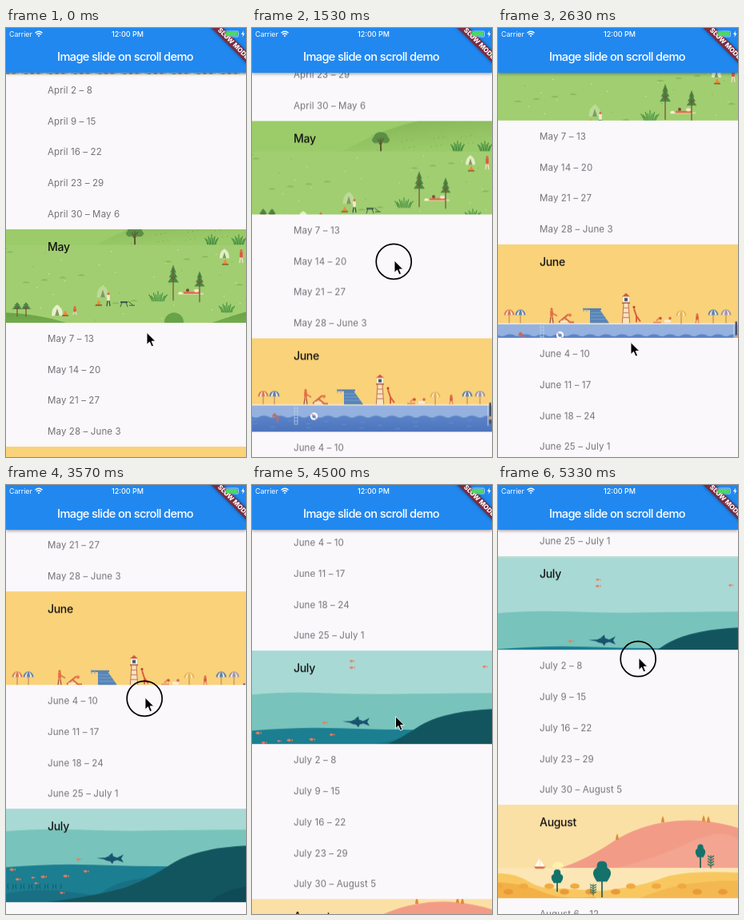
Write an HTML page that moves like this. It is 300 px wide and 537 px high and loops after 5.36 s.

```html
<!DOCTYPE html>
<html lang="en">
<head>
<meta charset="utf-8">
<title>Image slide on scroll demo</title>
<style>
html, body { margin: 0; width: 100%; height: 100%; overflow: hidden; }
body { position: relative; background: #faf8fb; font-family: Inter, Roboto, sans-serif; }
#stage { position: absolute; left: 0; top: 0; width: 300px; height: 537px; overflow: hidden; }
#list { position: absolute; left: 0; top: 0; width: 300px; will-change: transform; }
.row { position: absolute; left: 52px; margin-top: .8px; height: 38.8px; line-height: 38.8px; font-size: 11.5px; letter-spacing: .12px; color: #747276; white-space: nowrap; }
.banner { position: absolute; left: 0; width: 300px; height: 117px; overflow: hidden; }
.banner svg { position: absolute; left: 0; top: 0; }
.banner b { position: absolute; left: 52px; top: 11px; line-height: 21px; font-size: 14px; font-weight: 500; letter-spacing: -.3px; color: #111; }
#bar { position: absolute; left: 0; top: 0; width: 300px; height: 55.5px; background: #2188f0; box-shadow: 0 1px 4px rgba(0,0,0,.45); }
#bar h1 { position: absolute; left: 0; top: 26px; width: 298px; margin: 0; text-align: center; font-size: 14.6px; line-height: 21px; font-weight: 500; letter-spacing: -.62px; color: #fff; white-space: nowrap; }
#ribbon { position: absolute; left: 244px; top: 15px; width: 80px; height: 9.6px; background: #7b2c40; color: #fff; font-size: 8.2px; line-height: 9.6px; font-weight: 800; text-align: center; white-space: nowrap; transform: rotate(45deg); box-shadow: 0 0 4px rgba(0,0,0,.5); }
.status { position: absolute; top: 2px; line-height: 11px; font-size: 9px; color: #fff; white-space: nowrap; }
#icons, #pointer { position: absolute; left: 0; top: 0; overflow: visible; }
</style>
</head>
<body>
<div id="stage">
  <div id="list"></div>
  <div id="bar"><h1>Image slide on scroll demo</h1></div>
  <div id="ribbon">SLOW MODE</div>
  <span class="status" style="left:4px;font-size:8.8px">Carrier</span>
  <span class="status" style="left:102px;width:100px;text-align:center;font-weight:500">12:00 PM</span>
  <svg id="icons" width="300" height="20" fill="none" stroke="#fff">
    <path d="M36.5 6.2Q41 2.2 45.5 6.2M38.2 8.2Q41 5.8 43.8 8.2" stroke-width="1.4"/>
    <circle cx="41" cy="10" r="1" fill="#fff" stroke="none"/>
    <rect x="273.5" y="4" width="17" height="7" rx="1.5" stroke-width=".6"/>
    <rect x="274.5" y="5" width="15" height="5" rx="1" fill="#4cd964" stroke="none"/>
    <path d="M297 3.5L294 8H296L295.5 11.5L298.5 6.8H296.5Z" fill="#fff" stroke="none"/>
  </svg>
  <svg id="pointer" width="1" height="1">
    <circle id="ring" cx="-.8" cy="1.5" r="22" fill="none" stroke="#000" stroke-width="1.7"/>
    <path d="M0 .3V15.3L3.5 12L6 17.8L8.5 16.7L6.1 11.1H10.8Z" fill="#000" stroke="#fff" stroke-width=".9"/>
  </svg>
</div>
<script>
const LOOP = 5360, STEP = 100 / 3, ROW = 38.8, BANNER = 117, BAR = 55, SLIDE = 0.136;

// Shape helpers
const path = (d, fill) => `<path d="${d}" fill="${fill}"/>`;
const line = (d, color, w = 1) => `<path d="${d}" fill="none" stroke="${color}" stroke-width="${w}"/>`;
const rect = (x, y, w, h, fill) => `<rect x="${x}" y="${y}" width="${w}" height="${h}" fill="${fill}"/>`;
const oval = (x, y, rx, ry, fill) => `<ellipse cx="${x}" cy="${y}" rx="${rx}" ry="${ry}" fill="${fill}"/>`;
const many = (n, f) => Array.from({ length: n }, (_, i) => f(i)).join('');
const fade = (id, from, to, x = 0) => `<linearGradient id="${id}" x1="0" y1="0" x2="${x}" y2="1">` +
  `<stop stop-color="${from}"/><stop offset="1" stop-color="${to}"/></linearGradient>`;

const grass = (x, y, w, h) => many(9, i => {
  const k = (i - 4) / 4, tip = h * (1 - .35 * Math.abs(k)) * (i % 2 ? .75 : 1);
  return line(`M${x + k * w * .3} ${y}Q${x + k * w * .35} ${y - tip * .6} ${x + k * w / 2} ${y - tip}`, '#3f8b3c', 1.1);
});
const pine = (x, top, base, w) => {
  const tier = (base - top) * .17;
  return [0, 1, 2].map(i => path(`M${x} ${top + i * tier * .8}l${w * (.26 + i * .12)} ${tier * 1.3}h${-w * (.52 + i * .24)}z`, '#4b8843')).join('') +
    line(`M${x} ${top + 5}V${base}M${x - 3} ${top + tier * 2}l3 3l3 -4`, '#765a38', 1.3);
};
const tent = (x, y, r, fill) => path(`M${x - r} ${y}Q${x - r} ${y - r * 1.5} ${x} ${y - r * 2}Q${x + r} ${y - r * 1.5} ${x + r} ${y}z`, fill) +
  path(`M${x} ${y - r * 1.3}l${r * .4} ${r * 1.3}h${-r * .8}z`, '#7d9b62');
const person = (x, y, h, top, legs) => oval(x, y - h + 1.5, 1.5, 1.6, '#d9684a') +
  rect(x - 1.8, y - h + 3, 3.6, h * .42, top) +
  line(`M${x - 1} ${y - h * .4}L${x - 2} ${y}M${x + 1} ${y - h * .4}L${x + 2} ${y}`, legs, 1.3);
const fire = (x, y) => path(`M${x - 3} ${y}l3 -6l3 6z`, '#f08a32') + rect(x - 4, y, 8, 1.5, '#8b5634');
const umbrella = (x, y, color) => line(`M${x} ${y}V${y + 10}`, '#a96a55', .8) +
  path(`M${x - 6.5} ${y}a6.5 7 0 0 1 13 0z`, color) +
  path(`M${x - 4.5} ${y}q.5 -4 4 -6.5q-1.5 3 -1.5 6.5zM${x + 2} ${y}q0 -4 -1.5 -6.5q3.5 2 4 6.5z`, '#f8ead6');
const fish = (x, y, s = 1) => path(`M${x - 4 * s} ${y}q${4 * s} ${-3.5 * s} ${6 * s} 0l${2 * s} ${-1.5 * s}v${3 * s}l${-2 * s} ${-1.5 * s}q${-2 * s} ${3.5 * s} ${-6 * s} 0z`, '#ee7c5c');
const leafTree = (x, y, w, h, base) => rect(x - .8, y, 1.6, base - y, '#17594f') +
  path(`M${x} ${y - h / 2}q${w * .35} 0 ${w * .3} ${h * .3}q${w * .45} ${h * .2} 0 ${h * .65}h${-w * .6}q${-w * .45} ${-h * .45} 0 ${-h * .65}q${-w * .05} ${-h * .3} ${w * .3} ${-h * .3}z`, '#14726a');
const frond = (x, y, h) => line(`M${x} ${y}V${y - h}`, '#2c6f59', .9) + many(4, i =>
  line(`M${x - 4} ${y - h * (.35 + i * .2)}l4 ${h * .15}l4 ${-h * .15}`, '#2c6f59', 1.4));

// Scenes: 300 x 183, only a 117 px window shows
const april = () => rect(0, 0, 300, 183, '#f4cc72') + many(40, i =>
  rect(i * 7.7, 113 + i * 5 % 4, 4, 5, ['#e08a3c', '#5f9b57', '#f8e4a8', '#c9a24a'][i * 7 % 4]));

const may = () => fade('hill', '#7fb151', '#9bca6a', .4) + fade('mound', '#6aa446', '#8fc05f') +
  rect(0, 0, 300, 183, '#a1ce71') + rect(0, 0, 300, 46.4, '#9ccb6a') +
  path('M113 46.4Q139 32 168 20Q204 7 240 3Q275 0 300 0V46.4z', 'url(#hill)') +
  many(34, i => rect(i * 73 % 297, 50 + i * 41 % 95, 1.3, 1, i % 3 ? '#d9edb0' : '#7fb652')) +
  many(24, i => rect(150 + i * 37 % 145, 26 + i * 7 % 19, 1, 1, '#6fa346')) +
  many(14, i => path(`M${i * 89 % 290} ${56 + i * 29 % 84}q5 -4 10 0z`, '#86b95a')) +
  line('M161 46V30M161 38L155 30M161 37L167 29', '#5d5a35', 2) + oval(161, 29, 9, 7, '#5a8f45') + oval(155, 32, 5, 4, '#5a8f45') + oval(167, 32, 5, 4, '#5a8f45') +
  line('M161 40V29M161 36L157 31M161 35L165 30', '#5d5a35', 1.2) +
  grass(257, 46, 17, 13) + grass(291, 46, 18, 13) +
  tent(273, 63, 6, '#e4edc4') + fire(274, 70) + person(294, 69, 17, '#e0573e', '#f5e4cc') +
  rect(215, 106.5, 32, 2, '#d9dfa8') + rect(222, 105, 20, 2.5, '#e3674c') +
  oval(227, 103, 2, 2, '#7d4a37') + oval(238, 103.5, 3, 2, '#f8e3cd') + oval(218, 106.5, 2.5, 1.5, '#fff1da') +
  pine(209, 71, 116, 14) + pine(242, 79, 118, 13) +
  tent(121, 112, 7.5, '#bddb97') + person(128, 123, 17, '#f4e7cf', '#31545c') + fire(116, 121) +
  rect(143, 117, 9, 2, '#35524a') + line('M145 118L143 124M150 118L152 124M153 117L159 122M154 122H161', '#35524a', .9) +
  grass(190, 117, 23, 13) + grass(276, 131, 20, 13) +
  path('M0 183V131Q45 133 79 145L110 183z', 'url(#mound)') +
  pine(14, 118, 136, 14) + pine(25, 118, 136, 14) +
  tent(64, 135, 7, '#e8efcc') + fire(74, 134) + person(86, 134, 11, '#e0573e', '#f4d5bd') +
  oval(210, 143, 12, 12, '#68a349') + path('M300 183V130Q278 136 254 145L240 183z', 'url(#mound)');

const june = () => fade('shallow', '#9fb9e3', '#86a6da') + fade('deep', '#5c84c8', '#3c63b1') +
  rect(0, 0, 300, 183, '#f9d27a') +
  rect(0, 129, 300, 54, 'url(#shallow)') + rect(0, 129, 300, 15, '#94b1df') + rect(0, 128, 300, 1.5, '#f8eddb') +
  path('M0 183V143' + many(30, i => `q5 ${i % 2 ? -2 : 3} 10 0`) + 'V183z', 'url(#deep)') +
  many(18, i => rect(i * 67 % 290, 147 + i * 5 % 12, 6, .7, '#6f94d0')) +
  umbrella(14, 118, '#d9764e') + umbrella(28, 118, '#5b80ad') +
  person(67, 128, 19, '#e8713d', '#a9524a') + line('M67 115L74 119', '#d9684a', 1.5) +
  line('M76 127L83 121L90 127L95 127M83 121L88 117', '#d9684a', 2) + oval(90, 118, 2, 2, '#eb7448') + rect(78, 125, 9, 2, '#f7eee1') +
  rect(106, 109.5, 23, 2, '#4a78b0') + path('M115 111H127L139 128H115z', '#5784b8') +
  line('M107 109V114M111 109V114M116 115H129M116 119H132M116 123H135', '#7ea5cd', .9) +
  path('M155 95L160 90.5L165 95z', '#c9573f') + rect(156, 95, 8, 7, '#fff3df') + rect(155, 102, 10, 1.5, '#a84f3c') +
  path('M157 103.5H163L165 128H155z', '#fde3bd') + line('M157 103.5L155.3 128M163 103.5L164.7 128M157 109H163M156.5 115H163.500M156 121H164', '#b5654a', .9) + rect(158, 96.5, 4, 4, '#40597a') +
  line('M170 110L173 119L178 126M173 119L173 127', '#db5d3d', 1.9) + oval(170, 108, 1.6, 1.6, '#b9452e') +
  line('M194 127H204M198 125L202 121', '#e8895e', 1.8) + oval(203, 122, 1.8, 1.8, '#c95437') + rect(208, 124, 8, 3, '#f6efe1') + oval(215, 122, 1.8, 1.8, '#dc684a') +
  umbrella(229, 119, '#eab24c') + person(249, 128, 12, '#dc5c3e', '#e48761') +
  umbrella(269, 118, '#5b80ad') + umbrella(285, 118, '#9d93a8') +
  line('M53 130V153M57 130V153' + many(6, i => `M53 ${133 + i * 4}H57`), '#b9cdea', .8) +
  line('M25 143L31 142L34 148M30 143L32 151', '#a8727f', 1.7) + oval(28, 141, 1.8, 1.8, '#c9684f') +
  `<circle cx="77.5" cy="143" r="3.5" fill="none" stroke="#fff" stroke-width="2.4"/>` + line('M74.500 140l1.500 1.500M79 145l1.500 1.500', '#df684e', 1.3) +
  line('M295 129V155', '#d9dfe6', .9) + rect(296.5, 126, 2.5, 26, '#47506f') + rect(296, 143, 4, 4, '#d9a36e');

const july = () => rect(0, 0, 300, 183, '#a8d9d5') + rect(0, 0, 300, 7, '#b7ddce') +
  path('M0 76Q40 72 90 74T190 75T300 74V183H0z', '#78c3bb') +
  path('M0 121Q60 116 110 118T210 120L300 122V183H0z', '#1b7e91') +
  path('M0 183V154Q40 146 80 152T130 156L160 183z', '#196f83') +
  path('M90 183Q120 140 165 136Q190 132 215 114L230 183z', '#197084') +
  path('M40 166Q110 158 150 146Q180 135 205 118Q235 97 300 94V183H40z', '#12555f') +
  path('M230 183Q265 150 300 145V183z', '#0f4b56') +
  path('M113 109.500L124 109Q130 105 139 109L147 105L144 110L147 115L139 112Q130 116 122 111z', '#18536f') + path('M128 107l5 -4l1 5zM129 112l4 5l2 -5z', '#18536f') +
  [[125, 34, .8], [125, 42, .9], [291, 41, .8], [91, 111, .9], [8, 124], [15, 136, .9], [34, 134, .7], [47, 133], [75, 132], [100, 126, .9], [70, 153, .8], [38, 141, .7]].map(p => fish(...p)).join('') +
  many(14, i => line(`M${3 + i * 5} 148q${i % 2 ? 2 : -2} -4 0 -${6 + i * 5 % 5}`, '#13606e', 1.2));

const august = () => rect(0, 0, 300, 183, '#fbe0a5') +
  oval(75, 126, 7.5, 7.5, '#fff2ad') +
  path('M78 126Q105 118 138 97Q168 76 205 69.500Q250 61 300 76V126z', '#f29c88') +
  path('M150 126Q200 113 240 94T300 90V126z', '#f4a592') +
  [[206, 69], [257, 68], [263, 69], [149, 91]].map(([x, y]) => path(`M${x - 2} ${y}Q${x - 2} ${y - 4} ${x} ${y - 8}Q${x + 2} ${y - 4} ${x + 2} ${y}z`, '#df8a36')).join('') +
  rect(0, 126, 300, 57, '#fce6b5') + rect(62, 128, 27, 1, '#fff3cb') + rect(66, 131, 18, 1, '#fff3cb') +
  path('M52 114V124H46zM53 116L58 124H53z', '#fff') + path('M45 124.500H60L57 127H47z', '#dc6a4a') +
  path('M0 183V133Q20 132 38 143T80 152L130 155Q180 149 205 139T300 132V183z', '#f8c75f') +
  path('M0 183V144Q30 145 55 156T120 162L160 183z', '#f3b047') +
  path('M140 183Q180 160 215 151T300 142V183z', '#f4b850') +
  many(13, i => oval(i * 83 % 300, 149 + i * 7 % 14, 6, 3.5, i % 2 ? '#e99a38' : '#f0a940')) +
  leafTree(253, 105, 12, 17, 126) + frond(266, 127, 17) +
  leafTree(130, 131, 21, 27, 163) + leafTree(74, 137, 14, 18, 156) + frond(119, 161, 15);

// Scrolling content: month, scene, weeks
const months = [
  ['', april, ['April 2 – 8', 'April 9 – 15', 'April 16 – 22', 'April 23 – 29', 'April 30 – May 6']],
  ['May', may, ['May 7 – 13', 'May 14 – 20', 'May 21 – 27', 'May 28 – June 3']],
  ['June', june, ['June 4 – 10', 'June 11 – 17', 'June 18 – 24', 'June 25 – July 1']],
  ['July', july, ['July 2 – 8', 'July 9 – 15', 'July 16 – 22', 'July 23 – 29', 'July 30 – August 5']],
  ['August', august, ['August 6 – 12', 'August 13 – 19']]
];
const list = document.getElementById('list');
const banners = [];
let y = 58 - BANNER;
for (const [name, scene, weeks] of months) {
  const box = document.createElement('div');
  box.className = 'banner';
  box.style.top = y + 'px';
  box.innerHTML = `<svg width="300" height="183">${scene()}</svg><b>${name}</b>`;
  list.append(box);
  banners.push({ y, art: box.firstChild });
  y += BANNER;
  for (const week of weeks) {
    const row = document.createElement('div');
    row.className = 'row';
    row.style.top = y + 'px';
    row.textContent = week;
    list.append(row);
    y += ROW;
  }
}

// time, scroll, pointer x, pointer y
const keys = [
  [0, 0, 176, 381], [560, 0, 177, 427], [1000, 52, 177, 375], [1530, 135, 178, 291.5],
  [1760, 180, 180, 247], [1900, 212, 179, 260], [2050, 236, 174, 310], [2300, 253.2, 167, 370],
  [2630, 253.2, 166, 393], [2780, 253.2, 168, 404], [3100, 292, 170, 365], [3570, 391.6, 174, 265],
  [4000, 526, 198, 135], [4060, 545, 199, 118], [4200, 571, 196, 150], [4400, 586, 185, 250],
  [4600, 590, 176, 315], [4790, 590, 175, 328], [4930, 606.5, 175, 311], [5330, 706, 176, 217], [5360, 713, 176, 210]
];
const presses = [[560, 1760], [2780, 4060], [4790, LOOP]];

// Monotone cubic through one column of the table
const slope = (i, c) => (keys[i + 1][c] - keys[i][c]) / (keys[i + 1][0] - keys[i][0]);
const tangent = (i, c) => {
  if (i === 0) return slope(0, c);
  if (i === keys.length - 1) return slope(i - 1, c);
  const a = slope(i - 1, c), b = slope(i, c);
  return a * b <= 0 ? 0 : 2 * a * b / (a + b);
};
function valueAt(t, c) {
  let i = 0;
  while (i < keys.length - 2 && t >= keys[i + 1][0]) i++;
  const d = keys[i + 1][0] - keys[i][0], u = (t - keys[i][0]) / d, v = 1 - u;
  return keys[i][c] * (1 + 2 * u) * v * v + keys[i + 1][c] * u * u * (3 - 2 * u) +
    d * u * v * (tangent(i, c) * v - tangent(i + 1, c) * u);
}

const pointer = document.getElementById('pointer');
const ring = document.getElementById('ring');
const start = performance.now();
function draw() {
  const now = (performance.now() - start) % LOOP;
  const t = Math.min(Math.floor((now + 4) / STEP) * STEP, LOOP);
  const scroll = valueAt(t, 1);
  list.style.transform = `translateY(${-scroll}px)`;
  for (const b of banners) {
    const shift = Math.min(Math.max(b.y - scroll - BAR, 0), 482) * SLIDE;
    b.art.style.transform = `translateY(${-shift}px)`;
  }
  pointer.style.transform = `translate(${valueAt(t, 2)}px, ${valueAt(t, 3)}px)`;
  ring.style.display = presses.some(([a, b]) => t >= a && t < b) ? '' : 'none';
  requestAnimationFrame(draw);
}
draw();
</script>
</body>
</html>
```
